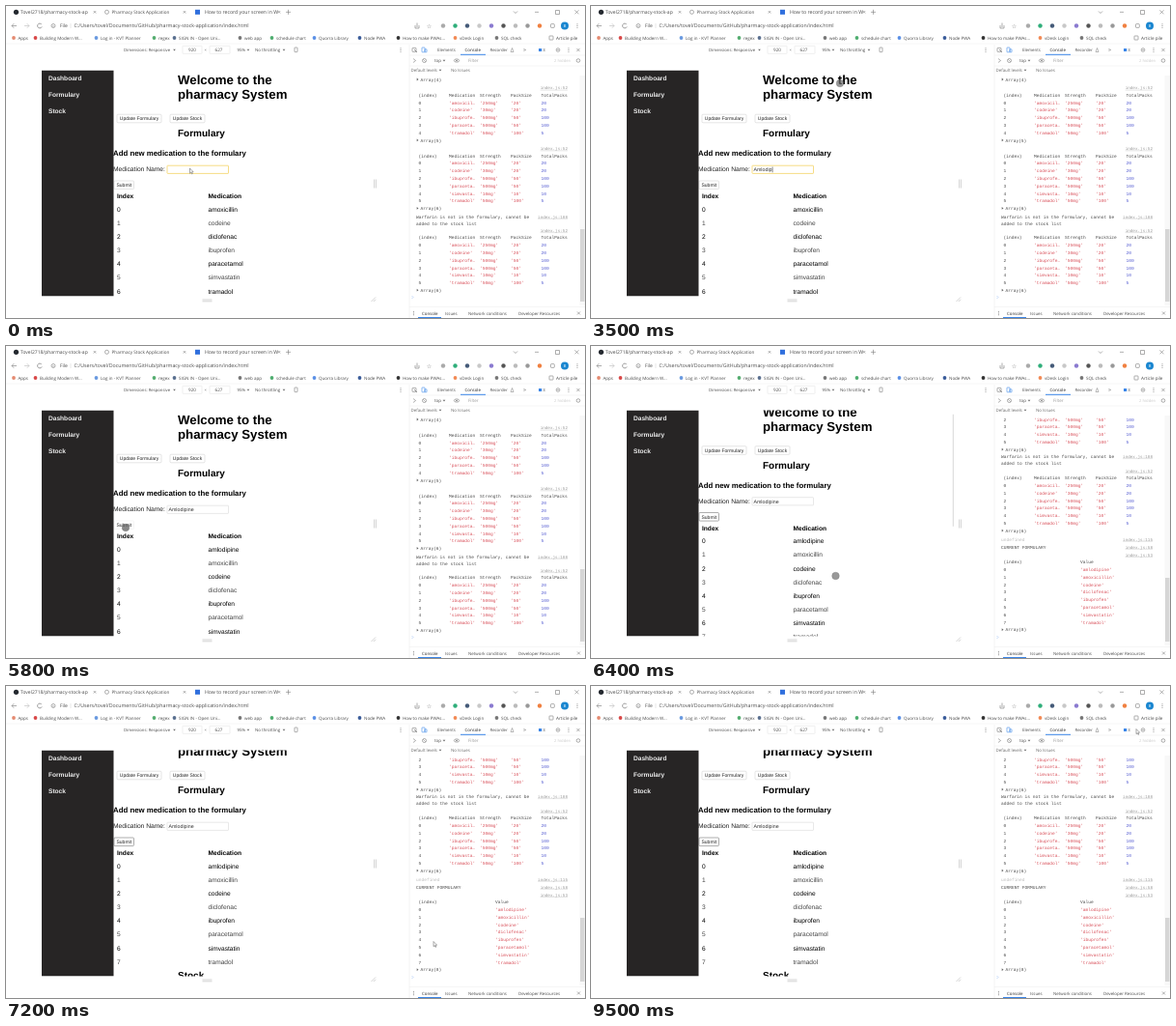
These frames come from a looping animation (600x323 px, 9.7 s). An HTML page with a canvas:

```html
<!DOCTYPE html>
<html lang="en">
<head>
<meta charset="utf-8">
<title>Pharmacy Stock Application</title>
<style>
html, body { margin: 0; width: 100%; height: 100%; overflow: hidden; background: #fff; }
canvas { display: block; width: 100%; height: 100%; }
</style>
</head>
<body>
<canvas id="stage"></canvas>
<script>
const W = 600, H = 323, LOOP = 9700;
const canvas = document.getElementById('stage');
const scale = Math.max(1, window.devicePixelRatio || 1);
canvas.width = W * scale;
canvas.height = H * scale;
const c = canvas.getContext('2d');

const ARIAL = '"Liberation Sans", Arial, sans-serif';
const UI = '"Open Sans", "Noto Sans", sans-serif';
const MONO = '"Liberation Mono", monospace';
const INK = '#4a4a4a', ICON = '#777', RED = '#d8505a', BLUE = '#5058d0', ACCENT = '#3b86e8';

// --- drawing helpers; text is placed by the middle of its capitals ---
function text(s, x, y, size, color = INK, font = ARIAL, weight = 400, align = 'left') {
  c.font = `${weight} ${size}px ${font}`;
  c.fillStyle = color;
  c.textAlign = align;
  c.fillText(s, x, y + size * 0.355);
}
const ui = (s, x, y, size = 4.4, color = INK) => text(s, x, y, size, color, UI);
const mono = (s, x, y, color = INK) => text(s, x, y, 4.55, color, MONO);
const bold = (s, x, y, size, color = '#000') => text(s, x, y, size, color, ARIAL, 700);

function rect(x, y, w, h, fill) {
  c.fillStyle = fill;
  c.fillRect(x, y, w, h);
}
function box(x, y, w, h, r, stroke, fill, width = 0.6) {
  c.beginPath();
  c.roundRect(x, y, w, h, r);
  if (fill) { c.fillStyle = fill; c.fill(); }
  if (stroke) { c.strokeStyle = stroke; c.lineWidth = width; c.stroke(); }
}
function dot(x, y, r, fill, stroke) {
  c.beginPath();
  c.arc(x, y, r, 0, 7);
  if (fill) { c.fillStyle = fill; c.fill(); }
  if (stroke) { c.strokeStyle = stroke; c.lineWidth = 0.6; c.stroke(); }
}
function path(points, color = ICON, width = 0.6) {
  c.beginPath();
  for (let i = 0; i < points.length; i += 2) c.lineTo(points[i], points[i + 1]);
  c.strokeStyle = color;
  c.lineWidth = width;
  c.stroke();
}
function cross(x, y, r, color = ICON) {
  path([x - r, y - r, x + r, y + r], color);
  path([x - r, y + r, x + r, y - r], color);
}
function triangle(x, y, down) {
  c.beginPath();
  if (down) { c.moveTo(x - 1.3, y - 0.7); c.lineTo(x + 1.3, y - 0.7); c.lineTo(x, y + 1); }
  else { c.moveTo(x - 0.8, y - 1.4); c.lineTo(x - 0.8, y + 1.4); c.lineTo(x + 1, y); }
  c.fillStyle = '#666';
  c.fill();
}
function menuDots(x, y) {
  for (const d of [-1.8, 0, 1.8]) dot(x, y + d, 0.5, ICON);
}
function clipped(x, y, w, h, draw) {
  c.save();
  c.beginPath();
  c.rect(x, y, w, h);
  c.clip();
  draw();
  c.restore();
}

// --- browser frame ---
const bookmarks = [
  ['Apps', 12.5, '#e58a70'], ['Building Modern W...', 35, '#d84848'],
  ['Log in - KVT Planner', 98, '#6a9ae0'], ['regex', 158, '#55ad70'],
  ['SIGN IN - Open Uni...', 179, '#5a7090'], ['web app', 247, '#777'],
  ['schedule chart', 280, '#4fae70'], ['Quorra Library', 324, '#5c90e6'],
  ['Node PWA', 371, '#3a5c9a'], ['How to make PWAs...', 411, '#333'],
  ['vDesk Login', 470, '#f28a55'], ['SQL check', 513, '#777']
];
function drawBrowser() {
  dot(10.5, 6.3, 2.6, '#24292f');
  ui('Tovel2718/pharmacy-stock-ap', 15, 6.3, 5);
  dot(104.5, 6.3, 2, null, ICON);
  ui('Pharmacy Stock Application', 109.5, 6.3, 4.65);
  rect(196, 3.8, 5, 5, '#2f6fdd');
  ui('How to record your screen in W', 206, 6.3, 5.2);
  for (const x of [92, 185, 283]) cross(x, 6.3, 1.2);
  path([290, 6.3, 295, 6.3]); path([292.5, 3.8, 292.5, 8.8]);
  path([526, 5.5, 528, 7.5, 530, 5.5]);
  path([548, 6.3, 552, 6.3]);
  box(569.5, 4.5, 4, 4, 0, ICON);
  cross(591.5, 6.3, 2);

  path([11, 20.5, 6, 20.5]); path([8.2, 18.2, 6, 20.5, 8.2, 22.8]);
  path([19, 20.5, 24, 20.5], '#bbb'); path([21.8, 18.2, 24, 20.5, 21.8, 22.8], '#bbb');
  c.beginPath(); c.arc(35, 20.5, 2.4, 0.4, 5.6);
  c.strokeStyle = ICON; c.lineWidth = 0.7; c.stroke();
  dot(49, 20.5, 2, null, ICON);
  rect(48.7, 20, 0.6, 1.7, ICON);
  ui('File', 56, 20.6, 5);
  path([67, 18, 67, 23], '#ccc', 0.5);
  ui('C:/Users/tovel/Documents/GitHub/pharmacy-stock-application/index.html', 70.5, 20.6, 5.25);
  path([424, 20, 424, 23, 428, 23, 428, 20]); path([426, 22, 426, 17.5]);
  text('☆', 438.5, 20.5, 6, ICON, '"DejaVu Sans", sans-serif', 400, 'center');
  ['#aaa', '#2fae7a', '#445a78', '#c8c8c8', '#8a7ad0', '#555', '#bbb', '#999', '#f08040']
    .forEach((color, i) => dot(453 + i * 12.5, 20.5, 2.2, color));
  box(564.5, 18.6, 3.8, 3.8, 0.7, ICON);
  dot(579, 20.5, 4, '#1a86d0');
  text('B', 579, 20.5, 4, '#fff', UI, 400, 'center');
  menuDots(592, 20.5);

  for (const [label, x, color] of bookmarks) {
    dot(x - 4.5, 33, 1.9, color);
    ui(label, x, 33, 4.5);
  }
  box(563, 31, 4, 4, 0.5, ICON);
  ui('Article pile', 570, 33, 4.6);
  path([0, 39, W, 39], '#eee', 0.5);
}

function drawDeviceBar() {
  ui('Dimensions: Responsive', 122, 45.5, 4.25);
  triangle(174.5, 45.5, true);
  box(183, 41.3, 20, 8, 0.5, '#e4e4e4', '#fff');
  ui('920', 189, 45.5, 4.6);
  ui('×', 205.5, 45.5, 4.2, ICON);
  box(211, 41.3, 21, 8, 0.5, '#e4e4e4', '#fff');
  ui('627', 216.5, 45.5, 4.6);
  ui('95%', 239.5, 45.5);
  triangle(251, 45.5, true);
  ui('No throttling', 258, 45.5);
  triangle(288, 45.5, true);
  box(299, 43, 3, 4.6, 0.4, ICON);
  menuDots(409, 45.5);
  // viewport resize handles
  const grip = '#b5b5b5';
  path([381.6, 179.5, 381.6, 188.5], grip); path([383.4, 179.5, 383.4, 188.5], grip);
  path([203.5, 304, 213.5, 304], grip); path([203.5, 305.8, 213.5, 305.8], grip);
  path([378.5, 306, 383, 301.5], grip); path([380.8, 306, 383, 303.8], grip);
}

// --- web page ---
const drugs = ['amoxicillin', 'codeine', 'diclofenac', 'ibuprofen', 'paracetamol', 'simvastatin', 'tramadol'];
const withNew = ['amlodipine', ...drugs];
const WORD = 'Amlodipine';
const keyTimes = [1700, 1900, 2100, 2300, 2500, 3300, 3500, 3700, 3900, 4100];
const scrollSteps = [8.5, 16.5, 22, 24];

function button(label, x, y, w, stroke = '#d4d4d4') {
  box(x, y - 4.3, w, 8.6, 1, stroke, '#fff');
  text(label, x + w / 2, y, 5.05, '#222', ARIAL, 400, 'center');
}

function drawPage(t) {
  const scroll = t < 6400 ? 0 : scrollSteps[Math.min(3, (t - 6400) / 100)];
  const list = t < 5700 ? drugs : withNew;
  const focused = t < 5600;
  const typed = keyTimes.filter(k => k <= t).length;
  const sinceKey = t - (keyTimes[typed - 1] ?? 1400);

  clipped(37, 66.5, 340, 234, () => {
    c.save();
    c.translate(0, -scroll);
    bold('Welcome to the', 178, 76.3, 13.25);
    bold('pharmacy System', 178, 91.6, 13.25);
    button('Update Formulary', 115, 116.5, 46);
    button('Update Stock', 170, 116.5, 36);
    bold('Formulary', 178, 131.8, 10);
    bold('Add new medication to the formulary', 111, 152.3, 7.83);
    text('Medication Name:', 111, 168.7, 6.7, '#222');
    box(167, 165.2, 63.5, 8.2, 0.5, focused ? '#f5d878' : '#d8d8d8', '#fff', focused ? 0.9 : 0.6);
    text(WORD.slice(0, typed), 168.4, 169.2, 5.3, '#333');
    if (focused && sinceKey >= 0 && sinceKey < 400) {
      const x = 168.6 + c.measureText(WORD.slice(0, typed)).width;
      rect(x, 166.5, 0.6, 5.8, '#333');
    }
    button('Submit', 112, 185.3, 20.5, t >= 5900 ? '#777' : t >= 5500 ? '#eee' : '#d4d4d4');
    bold('Index', 115, 196.8, 6.6);
    bold('Medication', 209.5, 196.8, 6.6);
    list.forEach((name, i) => {
      const y = 210.5 + i * 14.12, color = i % 2 ? '#444' : '#000';
      text(i, 115, y, 6.6, color);
      text(name, 209.5, y, 6.6, color);
    });
    bold('Stock', 178, 210 + list.length * 14.12, 10);
    c.restore();
    rect(37, 66.5, 74.5, 234, '#272525');
    ['Dashboard', 'Formulary', 'Stock'].forEach((s, i) => bold(s, 44, 74.8 + i * 16.8, 6.6, '#eee'));
    if (t >= 6400 && t < 6900) rect(374.8, 66.5 + scroll / 2, 1, 116, '#d8d8d8');
  });
}

// --- developer tools ---
const stock = [
  ["'amoxicil…", "'250mg'", "'20'", 20], ["'codeine'", "'30mg'", "'20'", 20],
  ["'ibuprofe…", "'500mg'", "'50'", 100], ["'paraceta…", "'500mg'", "'50'", 100],
  ["'simvasta…", "'10mg'", "'10'", 10], ["'tramadol'", "'50mg'", "'100'", 5]
];
const stockHead = ['Medication', 'Strength', 'PackSize', 'TotalPacks'];
const stockCols = [459, 491, 523, 554.5];

function source(line, y) {
  const s = 'index.js:' + line;
  text(s, 582, y, 4.3, '#999', MONO, 400, 'right');
  const w = c.measureText(s).width;
  path([582 - w, y + 2.3, 582, y + 2.3], '#bbb', 0.4);
}
function arrayLine(n, y) {
  triangle(426.5, y, false);
  mono(`Array(${n})`, 429.5, y);
}
function table(y, line, head, cols, rows) {
  source(line, y);
  mono('(index)', 427.5, y + 7.5);
  head.forEach((h, j) => mono(h, cols[j], y + 7.5));
  rows.forEach((row, i) => {
    const rowY = y + 15.2 + i * 7.8;
    mono(i, 427.5, rowY);
    row.forEach((v, j) => mono(v, cols[j], rowY, typeof v === 'number' ? BLUE : RED));
  });
  arrayLine(rows.length, y + 15.1 + rows.length * 7.8);
}
const stockTable = (y, rows = stock) => table(y, 52, stockHead, stockCols, rows);
function warning(y) {
  mono('Warfarin is not in the formulary, cannot be', 425, y);
  mono('added to the stock list', 425, y + 7.2);
  source(108, y);
}

function drawConsole(t) {
  const updated = t >= 5900;
  clipped(418, 72, 176, 238, () => {
    if (!updated) {
      arrayLine(4, 76);
      stockTable(84.8, stock.filter((_, i) => i !== 4));
      stockTable(147.5);
      warning(218);
      stockTable(232.3);
    } else {
      stockTable(45.2);
      warning(114.3);
      stockTable(129.2);
      mono('undefined', 425, 200, '#bbb');
      source(115, 200);
      mono('CURRENT FORMULARY', 425, 208);
      source(58, 208);
      table(216.2, 53, ['Value'], [507], withNew.map(name => [`'${name}'`]));
    }
    path([420.5, 300, 422, 301.5, 420.5, 303], '#8ab4f0', 0.5);
  });
  rect(594.5, 72, 5.5, 238, '#f8f8f8');
  const top = updated ? 240 : 231;
  rect(595, top, 4.5, 306 - top, '#d6d6d6');
}

function drawDevTools(t) {
  path([418, 40, 418, H], '#e4e4e4', 0.5);
  for (const y of [51, 62, 311.5]) path([418, y, W, y], '#eaeaea', 0.5);
  box(421, 43.4, 4, 4, 0.5, ICON);
  path([423, 45, 426, 48], '#555');
  box(431, 43, 3, 4.8, 0.4, ACCENT);
  box(434, 44.8, 2, 3, 0.3, ACCENT);
  ui('Elements', 447, 45.5);
  ui('Console', 475.5, 45.5, 4.4, '#222');
  rect(471, 49.8, 26, 1, ACCENT);
  ui('Recorder', 501.5, 45.5, 4.3);
  path([523, 47.5, 524.5, 43.5, 526, 47.5, 523, 47.5], ICON, 0.5);
  ui('»', 536, 45.2, 6, ICON);
  rect(552, 44, 3.2, 3, ACCENT);
  ui('3', 556.2, 45.5, 4.3);
  dot(572, 45.5, 1.8, null, ICON);
  dot(572, 45.5, 0.6, ICON);
  menuDots(583, 45.5);
  cross(593, 45.5, 1.6);

  path([422, 54.5, 424.5, 56.5, 422, 58.5]);
  dot(433.5, 56.5, 2, null, ICON);
  path([432.2, 55.2, 434.8, 57.8], ICON, 0.5);
  ui('top', 444, 56.5);
  triangle(454, 56.5, true);
  c.beginPath(); c.ellipse(467, 56.5, 2.7, 1.6, 0, 0, 7);
  c.strokeStyle = ICON; c.lineWidth = 0.6; c.stroke();
  dot(467, 56.5, 0.8, ICON);
  ui('Filter', 479, 56.5, 4.5, '#999');
  ui('2 hidden', 568, 56.5, 4.2, '#ccc');
  dot(593, 56.5, 1.8, null, ICON);
  ui('Default levels', 419.5, 66.5, 4.4, '#666');
  triangle(450, 66.5, true);
  ui('No Issues', 461, 66.5, 4.4, '#666');

  drawConsole(t);

  menuDots(422.5, 318);
  ui('Console', 431, 318, 4.4, '#222');
  rect(427, 322, 24, 1, ACCENT);
  ui('Issues', 455, 318);
  ui('Network conditions', 479, 318);
  ui('Developer Resources', 531, 318);
  cross(593.5, 318, 1.5);
}

// --- pointer: time, x, y ---
const route = [
  [700, 190.5, 168], [900, 222, 128], [1100, 258, 80], [4500, 258, 80], [4600, 263, 86],
  [4800, 241, 117], [5100, 175, 160], [5500, 124, 188], [5900, 124, 188], [6200, 253.5, 238],
  [6800, 253.5, 238], [7000, 370, 258], [7200, 443, 264.5], [7600, 443, 264.5],
  [7900, 483, 259], [8400, 483, 259], [8600, 596, 66], [8800, 596, 66],
  [9100, 590, 22], [9500, 565, 44.5]
];
function pointerAt(t) {
  const next = route.findIndex(p => p[0] >= t);
  if (next === 0) return route[0].slice(1);
  if (next < 0) return route[route.length - 1].slice(1);
  const [t0, x0, y0] = route[next - 1], [t1, x1, y1] = route[next];
  const k = (t - t0) / (t1 - t0);
  return [x0 + (x1 - x0) * k, y0 + (y1 - y0) * k];
}
function drawPointer(t) {
  const [x, y] = pointerAt(t);
  if (t >= 800 && x < 378) {
    const pressed = t >= 5500 && t < 5900;
    dot(x, y, 3.8, pressed ? 'rgba(95,95,95,.75)' : 'rgba(110,110,110,.7)', 'rgba(100,100,100,.5)');
    return;
  }
  c.beginPath();
  [[0, 0], [0, 5.2], [1.2, 4.1], [2, 5.9], [2.8, 5.5], [2, 3.8], [3.6, 3.7]]
    .forEach(([dx, dy]) => c.lineTo(x + dx, y + dy));
  c.closePath();
  c.fillStyle = '#fff';
  c.fill();
  c.strokeStyle = '#555';
  c.lineWidth = 0.5;
  c.stroke();
}

function frame() {
  const t = Math.floor(performance.now() % LOOP / 100) * 100;
  c.setTransform(scale, 0, 0, scale, 0, 0);
  c.textRendering = 'geometricPrecision';
  rect(0, 0, W, H, '#fff');
  drawBrowser();
  drawDeviceBar();
  drawPage(t);
  drawDevTools(t);
  drawPointer(t);
  requestAnimationFrame(frame);
}
frame();
</script>
</body>
</html>
```
